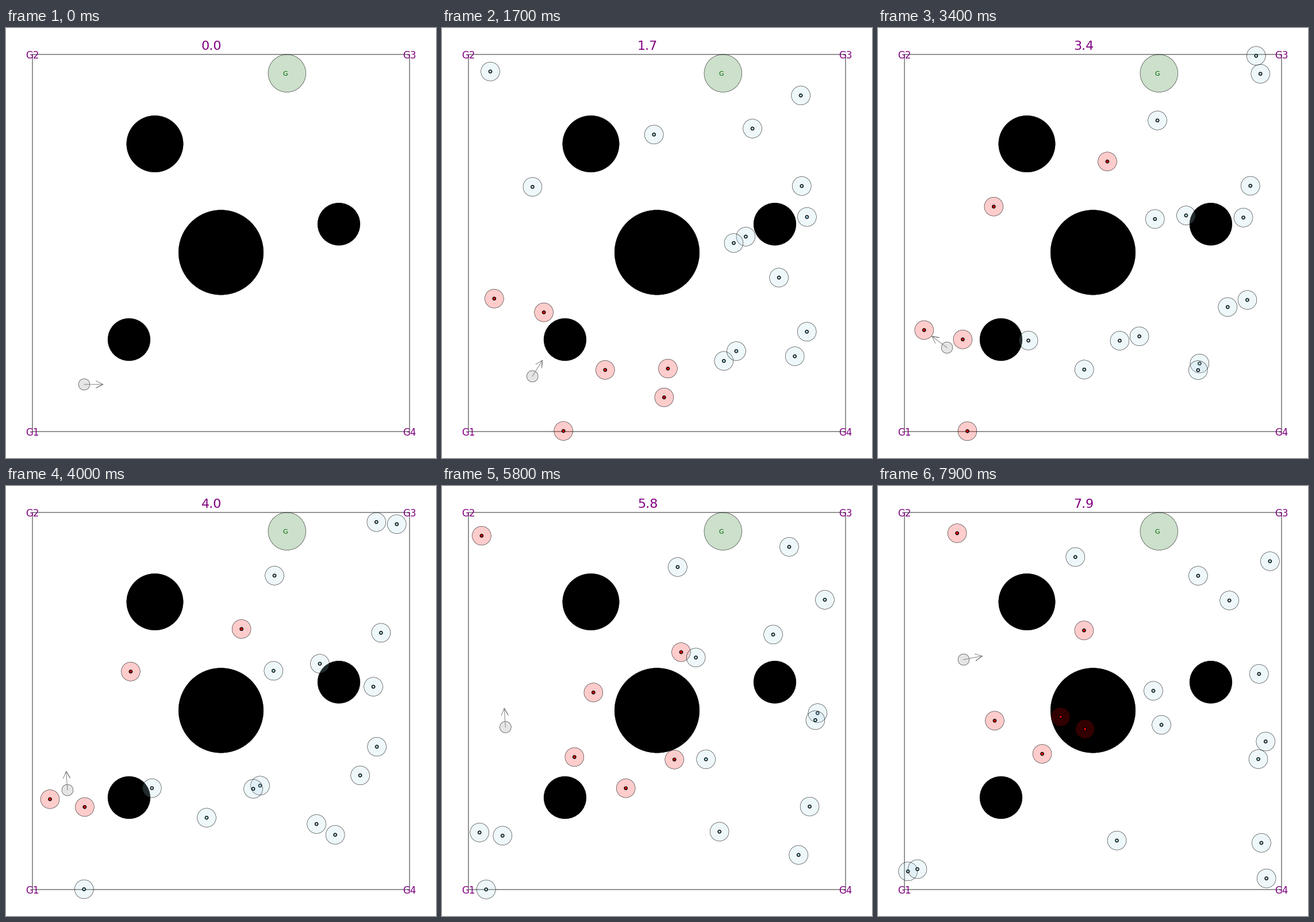
Write a matplotlib script that moves like this. It is 748 px wide and 748 px high and loops after 8000 ms.

```python
import numpy as np
import matplotlib.pyplot as plt
from matplotlib.animation import FuncAnimation
from matplotlib.colors import to_rgba
from matplotlib.patches import Circle, Rectangle

SIZE, DPI = 748, 100
FRAMES, STEP = 80, 0.1
UNIT = 32.8                      # pixels per metre, walkers do 1 m/s
LO, HI = 46, 702                 # arena walls
FOV, RANGE, MAX_SEEN = 147, 13.3 * UNIT, 6
CORNERS = {"G1": (LO, HI), "G2": (LO, LO), "G3": (HI, LO), "G4": (HI, HI)}
OBSTACLES = [(259, 201.6, 1.5), (374, 390.4, 2.25),
             (579, 341.2, 1.125), (214, 542, 1.125)]
GOAL = (488.8, 78.8)

# robot waypoints: time, x, y, heading in degrees
WAYPOINTS = [(0, 136, 620, 0), (0.9, 142, 619, 12), (2.4, 160, 583, 112),
             (3.4, 120, 556, 143), (4.7, 111, 488, 81),
             (6.8, 114, 358, 74), (7.9, 149, 302, 11)]
CRUISE, RAMP = 60, 3.7           # top speed in px/s, seconds to reach it

# where the walkers set out, by the corner they head for
STARTS = {
    "G2": [(594, 189), (575, 393.5), (526, 622), (306, 646), (414, 691),
           (128, 110)],
    "G3": [(583, 155), (622, 383), (479, 422), (627, 583.5), (365.5, 641)],
    "G1": [(101.5, 416), (207, 447.5), (267, 700.6), (668, 558.5)],
    "G4": [(338.5, 138.5), (616, 220), (564, 383), (467, 529), (113.5, 242)],
}
# wall points where walkers come back in after reaching a corner
RETURNS = [((660, LO), "G1"), ((LO, 88), "G3"), ((HI, 462), "G2")]


class Walk:
    """Straight walk to a corner at constant speed."""

    def __init__(self, start, corner, first, origin):
        self.start = np.array(start, float)
        self.way = np.array(CORNERS[corner]) - self.start
        self.dist = np.hypot(*self.way)
        self.first, self.origin = first, origin
        self.last = origin + int(np.ceil(self.dist / UNIT / STEP))

    def at(self, n):
        if not self.first <= n <= self.last:
            return None
        gone = (n - self.origin) * STEP * UNIT
        return self.start + self.way * min(gone / self.dist, 1)


walks = [Walk(p, name, 1, 0) for name, pts in STARTS.items() for p in pts]
arrivals = sorted(w.last for w in walks if w.last < FRAMES)
walks += [Walk(p, name, n + 1, n + 1)
          for n, (p, name) in zip(arrivals, RETURNS)]


def velocity(t, heading):
    speed = max(CRUISE * min(t / RAMP, 1), 2)
    a = np.radians(heading)
    return speed * np.array([np.cos(a), -np.sin(a)])


def robot_pose(t):
    """Position and heading on a cubic Hermite path."""
    a, b = next((a, b) for a, b in zip(WAYPOINTS, WAYPOINTS[1:])
                if t <= b[0] + 1e-6)
    h = b[0] - a[0]
    s = min((t - a[0]) / h, 1)
    p0, p1 = np.array(a[1:3]), np.array(b[1:3])
    m0, m1 = h * velocity(a[0], a[3]), h * velocity(b[0], b[3])
    pos = ((2 * s**3 - 3 * s**2 + 1) * p0 + (s**3 - 2 * s**2 + s) * m0
           + (3 * s**2 - 2 * s**3) * p1 + (s**3 - s**2) * m1)
    vel = ((6 * s**2 - 6 * s) * (p0 - p1) + (3 * s**2 - 4 * s + 1) * m0
           + (3 * s**2 - 2 * s) * m1)
    return pos, np.arctan2(-vel[1], vel[0])


def hidden(eye, p):
    """True when an obstacle's core stands between eye and p."""
    d = p - eye
    dist = np.hypot(*d)
    for x, y, r in OBSTACLES:
        c = np.array([x, y]) - eye
        off = abs(d[0] * c[1] - d[1] * c[0]) / dist
        if (d @ c > 0 and off < 0.55 * r * UNIT
                and dist > np.hypot(*c) + r * UNIT):
            return True
    return False


def seen(eye, heading, spots):
    """Indices of the nearest walkers in the robot's view."""
    near = []
    for i, p in enumerate(spots):
        if p is None:
            continue
        dx, dy = p - eye
        rel = np.degrees(np.arctan2(-dy, dx) - heading)
        rel = abs((rel + 180) % 360 - 180)
        dist = np.hypot(dx, dy)
        if rel < FOV and dist < RANGE and not hidden(eye, p):
            near.append((dist, i))
    return {i for _, i in sorted(near)[:MAX_SEEN]}


fig = plt.figure(figsize=(SIZE / DPI, SIZE / DPI), dpi=DPI, facecolor="white")
ax = fig.add_axes([0, 0, 1, 1])
ax.set_xlim(0, SIZE)
ax.set_ylim(SIZE, 0)
ax.axis("off")


def disc(xy, r, color, alpha=0.2, lw=0.36):
    return ax.add_patch(Circle(xy, r * UNIT, fc=to_rgba(color, alpha),
                               ec="black", lw=lw))


def label(x, y, text, size, color="purple"):
    return ax.text(x, y, text, fontsize=size, color=color, ha="center",
                   va="center_baseline", family="DejaVu Sans")


ax.add_patch(Rectangle((LO, LO), HI - LO, HI - LO, fill=False,
                       ec="black", lw=0.6, snap=False))
for x, y, r in OBSTACLES:
    disc((x, y), r, "black", 1)
disc(GOAL, 1, "darkgreen")
label(GOAL[0] - 0.1 * UNIT, GOAL[1], "G", 8, "darkgreen")
for name, (x, y) in CORNERS.items():
    label(x, y, name, 12)
clock = label(357.6, 29.6, "0.0", 16)

body = disc((0, 0), 0.3, "gray")
arrow, = ax.plot([], [], color="gray", lw=0.7)
discs = [(disc((0, 0), 0.5, "lightblue"),
          disc((0, 0), 0.08, "lightblue", 1, 1)) for _ in walks]


def update(n):
    t = n * STEP
    clock.set_text(f"{t:.1f}")

    pos, heading = robot_pose(t)
    body.center = pos
    u = np.array([np.cos(heading), -np.sin(heading)])
    side = np.array([-u[1], u[0]])
    tip = pos + UNIT * u
    pts = np.array([pos, tip, tip - 12 * u + 6 * side,
                    tip, tip - 12 * u - 6 * side])
    arrow.set_data(pts[:, 0], pts[:, 1])

    spots = [w.at(n) for w in walks]
    red = seen(pos, heading, spots)
    for i, (p, pair) in enumerate(zip(spots, discs)):
        color = "red" if i in red else "lightblue"
        for patch, alpha in zip(pair, (0.2, 1)):
            patch.set_visible(p is not None)
            if p is not None:
                patch.center = p
                patch.set_facecolor(to_rgba(color, alpha))
    return []


anim = FuncAnimation(fig, update, frames=FRAMES, interval=1000 * STEP,
                     repeat=True, repeat_delay=0, blit=False)
plt.show()
```
